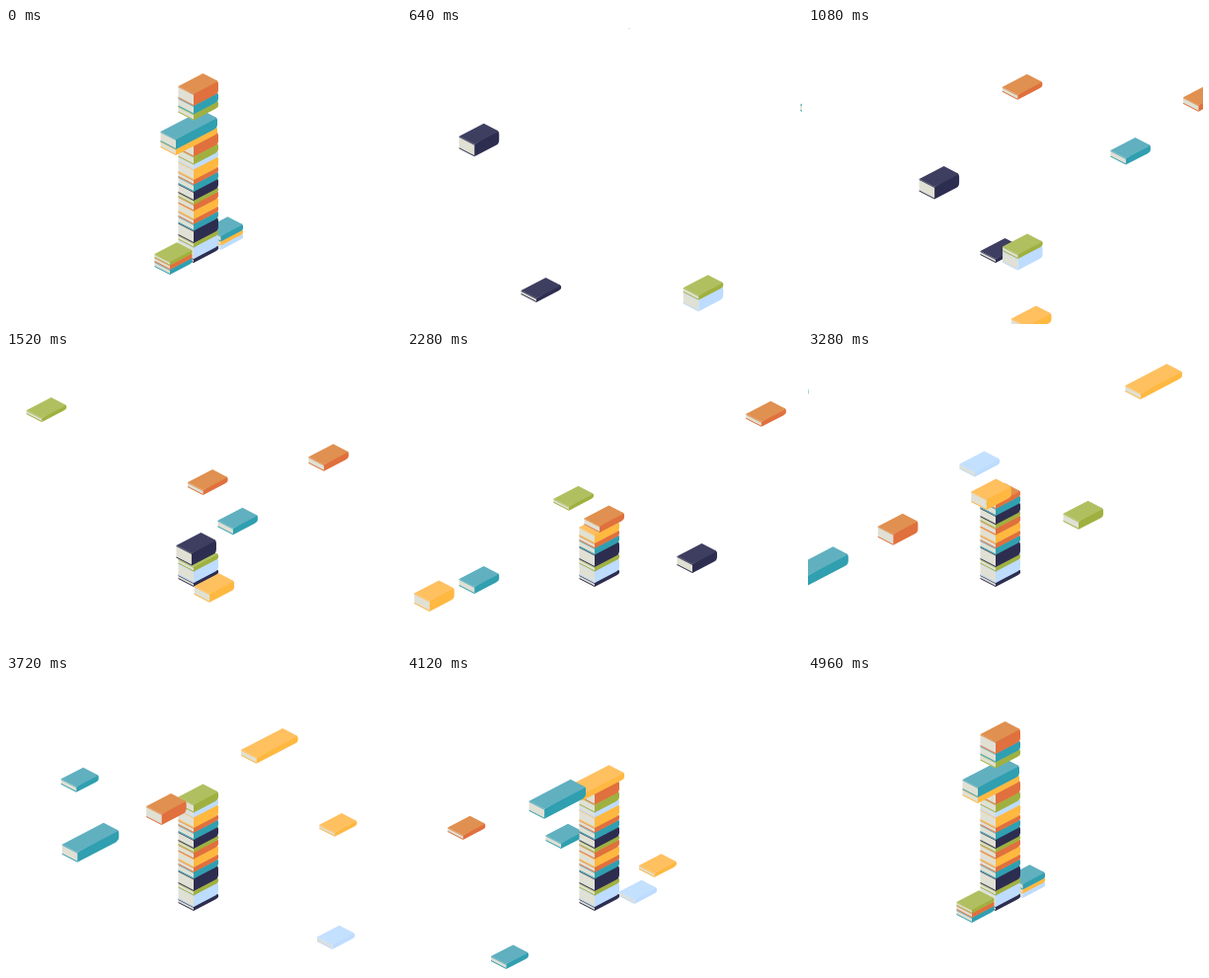
An HTML page with a canvas for the animation above (6.48 s loop, 400 by 300 pixels).

```html
<!DOCTYPE html>
<html>
<head>
<meta charset="utf-8">
<style>
  html, body { margin: 0; width: 100%; height: 100%; overflow: hidden; background: #fff; }
  canvas { display: block; }
</style>
</head>
<body>
<canvas id="stage" width="400" height="300"></canvas>
<script>
const ctx = document.getElementById('stage').getContext('2d');
const LOOP = 6480, FRAME = 40, END = 4960;
const SLOPE = 0.52, DEPTH = 15.5, DROP = 8;

// [cover, spine]
const COLORS = {
  navy: ['#3e3e60', '#2d2d50'],
  orange: ['#e09050', '#e0703d'],
  yellow: ['#ffc060', '#ffb840'],
  teal: ['#60b0c0', '#309fb0'],
  green: ['#b0c060', '#a0b040'],
  blue: ['#c4e0ff', '#bddcff']
};
const PAGES = '#e0e0d4';

// Each pile: x and y of its front bottom corner, spine length, then books from the bottom up:
// color, thickness, landing time (ms), direction it comes from (px per second)
const piles = [
  { x: 217.5, y: 225, len: 22.5, books: [
    ['blue', 4.5, 4172, 250, 115],
    ['yellow', 4, 4280, 206, -103],
    ['teal', 5.5, 4410, -212, -143]
  ] },
  { x: 190, y: 238, len: 25, books: [
    ['navy', 4, 993, -167, 113],
    ['blue', 11.5, 1200, 188, 95],
    ['green', 4.5, 1200, 188, 95],
    ['navy', 12.5, 1535, -136, -98],
    ['teal', 6.5, 1711, 209, -106],
    ['orange', 5, 1850, 29, -164],
    ['yellow', 8.5, 1980, 35, 130],
    ['orange', 6.5, 2310, 167, -82],
    ['green', 4, 2435, -168, -118],
    ['navy', 9, 2780, 198, 98],
    ['teal', 7, 2960, -179, 116],
    ['orange', 5, 3120, 201, -99],
    ['yellow', 10.5, 3338, -158, 103],
    ['blue', 5, 3380, -210, -170],
    ['green', 8, 3720, 191, 94],
    ['orange', 11, 3920, -162, 102]
  ] },
  { x: 166, y: 250, len: 22.5, books: [
    ['teal', 5, 4432, -210, 151],
    ['orange', 4.5, 4640, -210, -152],
    ['green', 3.5, 4870, 210, 115]
  ] },
  { x: 172, y: 129, len: 42, books: [
    ['yellow', 6, 4152, 189, -93],
    ['teal', 10, 4317, -167, 110]
  ] },
  { x: 190, y: 93.5, len: 25, books: [
    ['green', 6, 4760, 300, -150],
    ['teal', 8.5, 4860, -210, -150],
    ['orange', 12, 4960, 8, -100]
  ] }
];

function fill(color, points) {
  ctx.fillStyle = color;
  ctx.beginPath();
  for (const [x, y] of points) ctx.lineTo(x, y);
  ctx.fill();
}

// A strip of the page side, from height a to height b above the front corner
function side(color, x, y, a, b) {
  fill(color, [[x, y - a], [x, y - b], [x - DEPTH, y - DROP - b], [x - DEPTH, y - DROP - a]]);
}

function drawBook(x, y, len, h, [cover, spine]) {
  const rise = len * SLOPE, rx = x + len, ry = y - rise, top = y - h;
  const edge = Math.min(1, h * 0.25);
  side(PAGES, x, y, 0, h);
  side(spine, x, y, 0, edge);
  side(cover, x, y, h - edge, h);

  ctx.fillStyle = spine;
  ctx.beginPath();
  ctx.moveTo(x, top);
  ctx.lineTo(x, y);
  ctx.lineTo(rx - 3, ry + 3 * SLOPE);
  ctx.quadraticCurveTo(rx, ry, rx, ry - h * 0.3);
  ctx.lineTo(rx, ry - h * 0.8);
  ctx.quadraticCurveTo(rx, ry - h, rx - 2, ry - h - 1);
  ctx.fill();

  ctx.fillStyle = cover;
  ctx.beginPath();
  ctx.moveTo(x, top);
  ctx.lineTo(x - DEPTH, top - DROP);
  ctx.lineTo(rx - DEPTH, ry - h - DROP);
  ctx.lineTo(rx - 2, ry - h - 1);
  ctx.quadraticCurveTo(rx, ry - h, rx - 2, ry - h + 2 * SLOPE);
  ctx.fill();
}

function draw(now) {
  let t = Math.floor(now % LOOP / FRAME) * FRAME;
  if (t < FRAME) t = END;
  ctx.fillStyle = '#fff';
  ctx.fillRect(0, 0, 400, 300);
  for (const { x, y, len, books } of piles) {
    let base = y;
    for (const [color, h, land, vx, vy] of books) {
      const left = Math.max(0, land - t) / 1000;
      drawBook(x + vx * left, base + vy * left, len, h, COLORS[color]);
      base -= h;
    }
  }
}

const start = performance.now();
function tick() {
  draw(performance.now() - start);
  requestAnimationFrame(tick);
}
tick();
</script>
</body>
</html>
```
